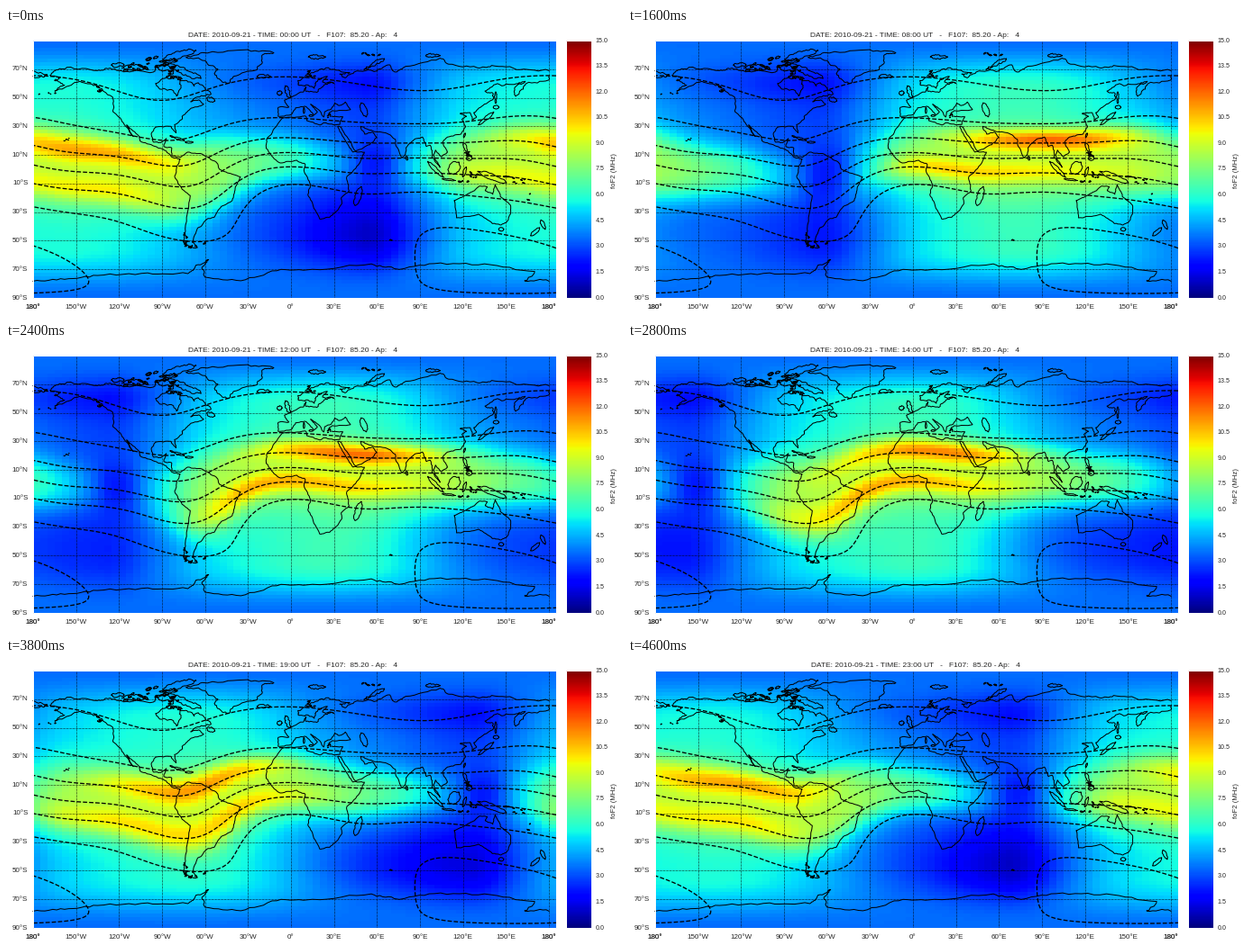
Animation of 683 by 319 pixels, one loop 4.8 s. Source, as a matplotlib script:

```python
import math
import numpy as np
from numpy.polynomial.legendre import Legendre
import matplotlib.pyplot as plt
from matplotlib.animation import FuncAnimation

W, H, DPI = 683, 319, 64
PT = 72 / DPI  # points per pixel
L, R, T, B = 30, 610, 14, 300
INK = "#262626"
rng = np.random.default_rng(7)

plt.rcParams["font.family"] = "Liberation Sans"
fig = plt.figure(figsize=(W / DPI, H / DPI), dpi=DPI, facecolor="white")
ax = fig.add_axes([0, 0, 1, 1])
ax.axis("off")


def px(lon):
    return L + (np.asarray(lon) + 180) * (R - L) / 365


def py(lat):
    return T + (90 - np.asarray(lat)) * (B - T) / 180


# Main field of the Earth: (g, h) in nT by degree and order
GAUSS = [
    [(-29496, 0), (-1586, 4945)],
    [(-2397, 0), (3026, -2708), (1669, -575)],
    [(1340, 0), (-2326, -160), (1232, 252), (634, -537)],
    [(913, 0), (809, 286), (167, -211), (-357, 164), (90, -309)],
    [(-231, 0), (357, 45), (200, 189), (-141, -118), (-163, 0), (-8, 101)],
]


def schmidt(n, m, theta):
    norm = math.sqrt((2 if m else 1) * math.factorial(n - m) / math.factorial(n + m))
    return norm * np.sin(theta) ** m * Legendre.basis(n).deriv(m)(np.cos(theta))


def inclination(lon, lat):
    """Magnetic dip in radians on a lat by lon grid."""
    phi, theta = np.meshgrid(np.radians(lon), np.radians(90 - lat))
    down = south = east = 0
    e = 1e-4
    for n, row in enumerate(GAUSS, 1):
        for m, (g, h) in enumerate(row):
            c, s = np.cos(m * phi), np.sin(m * phi)
            p = schmidt(n, m, theta)
            slope = (schmidt(n, m, theta + e) - schmidt(n, m, theta - e)) / (2 * e)
            down = down - (n + 1) * (g * c + h * s) * p
            south = south - (g * c + h * s) * slope
            east = east + m * (g * s - h * c) * p / np.sin(theta)
    return np.arctan2(down, np.hypot(south, east))


# Model grid: 5 degrees of longitude by 2.5 of latitude
lon = np.arange(-180, 185, 5.0) + 2.5
lat = np.arange(88.75, -90, -2.5)
col = lat[:, None]
mag = np.degrees(np.arctan(np.tan(inclination(lon, lat)) / 2))


def daily(lt, values):
    """Two-hourly values over local time, slightly smoothed."""
    hours = np.arange(0, 24, 2)
    return sum(np.interp(lt + d, hours, values, period=24)
               for d in (-0.5, 0, 0.5)) / 3


def wave(centre):
    return np.cos(np.radians(lon - centre))


def bell(x, width):
    return np.exp(-0.5 * (x / width) ** 2)


def critical_frequency(ut):
    lt = (ut + lon / 15) % 24
    eq = daily(lt, [6.4, 4.6, 1.6, 5.6, 8.2, 8.3, 8.4, 8.4, 8.4, 8.4, 8.1, 7.4])
    mid = daily(lt, [3.6, 3.1, 2.8, 4.3, 5.5, 6.0, 6.3, 6.4, 6.1, 5.4, 4.6, 4.0])
    north = daily(lt, [0, 0, 0, 0, 0, .35, .78, 1, .97, .65, .2, 0])
    south = daily(lt, [0, 0, 0, .1, .75, 1, 1, 1, .9, .6, .2, 0])
    day = np.clip((mid - 2.8) / 3.6, 0, 1)

    # Mid latitudes, with a night trough on each side
    base = (mid - 0.3 * day * (1 - wave(40))
            - (1 - day) * (bell(col - 64, 12)
                           + 1.25 * (1 + 0.6 * wave(70)) * bell(col + 45, 20)))
    p = np.clip((np.abs(col) - 55) / 35, 0, 1)
    p = p * p * (3 - 2 * p)
    base = base * (1 - p) + 3.5 * p

    # Equatorial belt and its two crests
    belt = np.exp(-(np.abs(mag + col) / 2 / (16 + 11 * day)) ** 2.4)
    return (base + (eq - base) * belt
            + north * (3.7 + 0.7 * wave(80)) * bell(mag - 16, 6.5)
            + south * (2.0 + 0.7 * wave(-45)) * bell(mag + 12.5, 6.5))


field = ax.imshow(critical_frequency(0), cmap="jet", vmin=0, vmax=15,
                  extent=(L, R, B, T), aspect="auto", interpolation="nearest")
ax.imshow(np.linspace(15, 0, 256)[:, None], cmap="jet", vmin=0, vmax=15,
          extent=(621, 649, B, T), aspect="auto")


def stroke(x, y, width=1.0, **kw):
    ax.plot(x, y, color="black", lw=width * PT, **kw)


def label(x, y, s, size=8, **kw):
    kw = dict(ha="center", va="center", color=INK) | kw
    return ax.text(x, y, s, fontsize=size * PT, **kw)


def rough(p):
    """Midpoint displacement; coasts are more broken at high latitudes."""
    for _ in range(3):
        d = np.diff(p, axis=0)
        size = np.hypot(*d.T)[:, None] + 1e-9
        normal = np.c_[-d[:, 1], d[:, 0]] / size
        amp = np.where(np.abs(p[:-1, 1:]) > 50, 0.25, 0.13)
        kick = amp * np.minimum(size, 3) * rng.uniform(-1, 1, size.shape)
        out = np.empty((2 * len(p) - 1, 2))
        out[::2] = p
        out[1::2] = p[:-1] + d / 2 + normal * kick
        p = out
    return p


def coast(*v):
    p = rough(np.reshape(v, (-1, 2)).astype(float))
    stroke(px(p[:, 0]), py(p[:, 1]))


def island(x, y, a, b, tilt=0):
    """Rough ellipse with half axes a, b in degrees."""
    t = np.linspace(0, 2 * np.pi, 9)
    u, v = a * np.cos(t), b * np.sin(t)
    c, s = np.cos(np.radians(tilt)), np.sin(np.radians(tilt))
    coast(*np.c_[x + u * c - v * s, y + u * s + v * c].ravel())


def specks(n, x, y, dx, dy, size=0.5):
    for _ in range(n):
        a = size * rng.uniform(0.6, 2)
        island(x + rng.uniform(-dx, dx), y + rng.uniform(-dy, dy),
               a, a * 0.4, rng.uniform(-40, 40))


# North America: Arctic, Atlantic and Pacific sides
coast(-168, 65.6, -166, 68.3, -156.5, 71.3, -135, 69, -128, 70.3, -115, 68.5, -96, 68,
      -95, 71.5, -90, 68.7, -82, 69.5, -82, 67, -87, 64.5, -94.5, 60, -92.5, 57,
      -82.5, 55.2, -80, 51.3, -76.7, 57, -77.5, 62.4, -70, 61, -67.5, 58.3, -64.7, 60.3)
coast(-64.7, 60.3, -55.8, 52.5, -66.5, 50.2, -70, 47.2, -64.5, 48.5, -61, 45.5, -66, 43.6,
      -70.5, 42, -76, 37, -75.8, 35.3, -81.3, 31.2, -80.2, 25.5, -83.8, 30, -94.5, 29.4,
      -97.5, 25, -96, 19, -91, 18.6, -87, 21.5, -88.7, 15.8, -83.3, 15, -83, 9.5, -77, 8.5)
coast(-168, 65.6, -161, 64.3, -165, 62, -158, 58.8, -164.8, 54.7, -152, 60, -146, 60.8,
      -135, 58.3, -124, 48.5, -124.3, 40.3, -117, 32.5, -110, 23, -114.7, 31, -106, 23,
      -105.5, 20, -95, 16, -87.5, 13, -83, 8.4, -77.5, 7)
# South America
coast(-77, 8.5, -72, 12, -62, 10.6, -52, 4.8, -50, 0, -44.5, -2.5, -35.3, -5.3, -39, -13.5,
      -41, -21.9, -48.6, -26, -53.5, -33.5, -58, -34.5, -62, -39, -65, -41, -67, -45.5,
      -69, -51, -65.3, -54.8, -70, -55.3, -75, -50, -73.6, -39, -70.3, -18.4, -76, -14,
      -81.2, -5, -80, 0, -77.5, 7)
# Greenland
coast(-73, 78.2, -60, 76, -51, 70, -53.5, 67, -48, 61, -43.5, 60, -40, 65, -24, 69.5,
      -20, 75, -20, 80, -12, 81.5, -33, 83.5, -62, 81.6, -73, 78.2)
# Eurasia: Arctic, Pacific and Indian Ocean sides
coast(5, 62, 14, 67.5, 26, 71, 41, 67.5, 34, 66.6, 38, 64, 44, 68, 60, 68.8, 69, 73,
      73, 68, 80, 72, 104, 77.7, 110, 73.5, 130, 71, 140, 72.6, 160, 69.7, 180, 69)
coast(-180, 68.9, -170, 66.1, -173, 64.4, -180, 65)
coast(180, 65, 179.5, 62.3, 164, 59.9, 162, 56, 156.7, 51, 156, 57, 163.5, 61.5,
      155, 59.3, 142.5, 59.3, 135.3, 54.7, 141, 53, 140.5, 48.5, 132, 43.2, 127.5, 39.6,
      129.4, 36.5, 126.4, 34.5, 125, 39.6, 118, 39, 122.4, 37, 119.3, 35, 121.8, 30,
      118.5, 24.5, 108, 21.6, 105.8, 19, 109, 12)
coast(109, 12, 105, 8.7, 100.8, 13.4, 99.3, 10, 104, 1.4, 98.3, 8.5, 98.5, 13, 97.3, 16.7,
      94.4, 16, 91.8, 22.5, 87, 21.4, 80.2, 15, 79.8, 10.3, 77.6, 8, 73, 17, 72.7, 21,
      66.7, 25.2, 57, 26.8, 48.5, 30, 51.5, 24.5, 56.3, 26, 59.8, 22.5, 55, 17.2,
      45, 12.8, 42.7, 16, 34.9, 29.4)
# Africa
coast(34.9, 29.4, 32.5, 29.9, 37.3, 21, 43.2, 12, 51.2, 11.9, 48, 4.5, 39, -5,
      40.5, -15, 35, -20, 35.5, -24, 31, -30, 27, -33.6, 20, -34.8, 14.5, -22.5, 11.8, -17.5,
      13.7, -11, 9, -.7, 9.7, 3.8, 4, 6.3, -7.5, 4.4, -13, 8.8, -17.4, 14.7, -17, 21,
      -9.6, 31, -6, 35.8, 10, 37.3, 11, 34, 20, 31, 23, 32.5, 34, 31.3, 36, 36.6)
# Europe
coast(36, 36.6, 27.3, 37, 26.5, 39.5, 29, 41, 41.5, 41.7, 38, 47, 33.5, 44.5, 30.5, 46.4,
      28, 42, 23.5, 40.3, 22.8, 36.5, 19.4, 41.5, 13.7, 45.5, 18.4, 40, 16, 38, 10, 44,
      3.2, 43, -.5, 38, -9, 37, -9, 43.2, -1.5, 43.5, -4.6, 48.3, 8.5, 54, 10.5, 57.6,
      10.5, 54.5, 19, 54.5, 23.5, 59.2, 30, 60, 22, 61, 25.3, 65, 17.3, 61, 16.3, 56.6,
      11, 59, 5, 59, 5, 62)
# Australia
coast(114, -22, 115.5, -34, 124, -33, 131, -31.5, 140.5, -38, 146.3, -39, 150, -37.3,
      153, -31.5, 153, -25, 146, -19, 142.5, -10.7, 140.8, -17.5, 135.5, -15, 136.8, -12.2,
      131, -12, 128, -15, 122.2, -18, 114, -22)
# Antarctica
coast(-180, -78.3, -158, -77, -135, -74.3, -100, -72.5, -72, -73, -67, -68.5, -57.5, -63.3,
      -62, -70, -60, -75.5, -35, -78, -10, -71, 15, -70, 56, -66.2, 72, -69.5, 100, -66,
      135, -66.2, 170, -71.5, 163, -78, 180, -78.3)

# Large islands (and the Caspian)
for shape in [(-78, 80, 12, 2.6, 15), (-75, 68.5, 13, 2.5, -22), (-110, 70.8, 8, 2),
              (-121, 73, 4.5, 1.4), (-86, 75.4, 6, .8), (-84, 64.5, 3, 1.1),
              (-56, 48.8, 3, 1.8, -20), (-79.5, 21.7, 5.3, .7, -18), (-71.2, 18.9, 2.7, .7),
              (-2.3, 54, 4.6, 1.7, 110), (-8, 53.3, 1.7, 1.7), (-19, 65, 4.8, 1.3),
              (18, 78.6, 6, 1.4), (58, 73.5, 8, 1.3, 28), (99, 79.5, 5, 1.1),
              (50.8, 41.5, 5.2, 2.2, 110), (9, 41, 2, .5, 90), (14, 37.5, 1.5, .6)]:
    island(*shape)
for shape in [(136, 35.5, 7, 1.1, 40), (143, 43.4, 2, 1.3), (142.8, 50, 4, .7, 90),
              (121, 23.7, 1.5, .5, 70), (121.5, 15.5, 3.3, 1.1, 110), (124.3, 7.6, 2, 1.6),
              (80.8, 7.8, 1.5, .8, 100), (46.8, -18.8, 7, 2.2, 72), (100.8, 0, 7.8, 1.3, -45),
              (110, -7.3, 4.6, .6, -7), (113.8, .9, 5.2, 3.8, 50), (121, -2, 3.6, 1, 70),
              (140.5, -5.5, 10.5, 2, -22), (150.3, -5.2, 2, .4), (146.6, -42, 1.8, 1.3),
              (175.8, -38.7, 3.6, 1.2, -65), (170.3, -43.8, 4.2, 1.3, 42)]:
    island(*shape)
# Archipelagos
for group in [(26, -97, 74, 19, 5, 1), (10, -80, 66, 8, 3, .7), (12, -73.8, -49, 1, 5.5, .4),
              (5, -69, -54.3, 3, .6), (2, -59.5, -51.7, 1, .3), (4, -157, 20.7, 2, 1, .2),
              (6, -134, 56.5, 2, 2), (5, -170, 53, 6, .6, .3), (5, 25, 37, 2, 2, .3),
              (6, 55, 80.5, 7, .6), (7, 123.5, 11, 2, 1.5), (9, 128, -3, 3, 3),
              (6, 120, -8.6, 4, .4), (6, 159, -8, 4, 2, .4), (4, 166, -19, 2, 3, .3),
              (8, 13, 67, 4, 2.5, .4), (3, 69.5, -49.3, .6, .3, .3)]:
    specks(*group)

# Graticule
for deg in range(-180, 181, 30):
    stroke([px(deg)] * 2, [T, B], 0.7, dashes=(1, 1))
    text = f"{abs(deg)}°" + ("" if deg % 180 == 0 else "W" if deg < 0 else "E")
    for _ in range(2 if abs(deg) == 180 else 1):
        label(px(deg), 310, text)
for deg in range(-90, 71, 20):
    stroke([L, R], [py(deg)] * 2, 0.7, dashes=(1, 1))
    label(24.5, py(deg), f"{abs(deg)}°{'N' if deg > 0 else 'S'}", ha="right")

# Contours of magnetic dip
fine_lon, fine_lat = np.arange(-180, 185.5, 1), np.arange(89.5, -90, -1)
ax.contour(px(fine_lon), py(fine_lat), np.degrees(inclination(fine_lon, fine_lat)),
           levels=range(-75, 76, 25), colors="black", linewidths=1.3 * PT,
           linestyles="dashed")

# Colour scale and frames
for left, right in [(L, R), (621, 649)]:
    ax.add_patch(plt.Rectangle((left, T), right - left, B - T, fill=False,
                               ec="white", lw=PT, zorder=3))
for v in np.arange(0, 15.1, 1.5):
    label(654, B - v / 15 * (B - T), f"{v:.1f}", 7.1, ha="left")
label(674, 158, "foF2 (MHz)", 7.8, rotation=90)
title = label(318.5, 8, "", 8.4)
ax.set(xlim=(0, W), ylim=(H, 0))


def update(hour):
    field.set_data(critical_frequency(hour))
    title.set_text(f"DATE: 2010-09-21 - TIME: {hour:02d}:00 UT   -   "
                   "F107:  85.20 - Ap:   4")
    return field, title


anim = FuncAnimation(fig, update, frames=24, interval=200, repeat=True,
                     repeat_delay=0)
plt.show()
```
